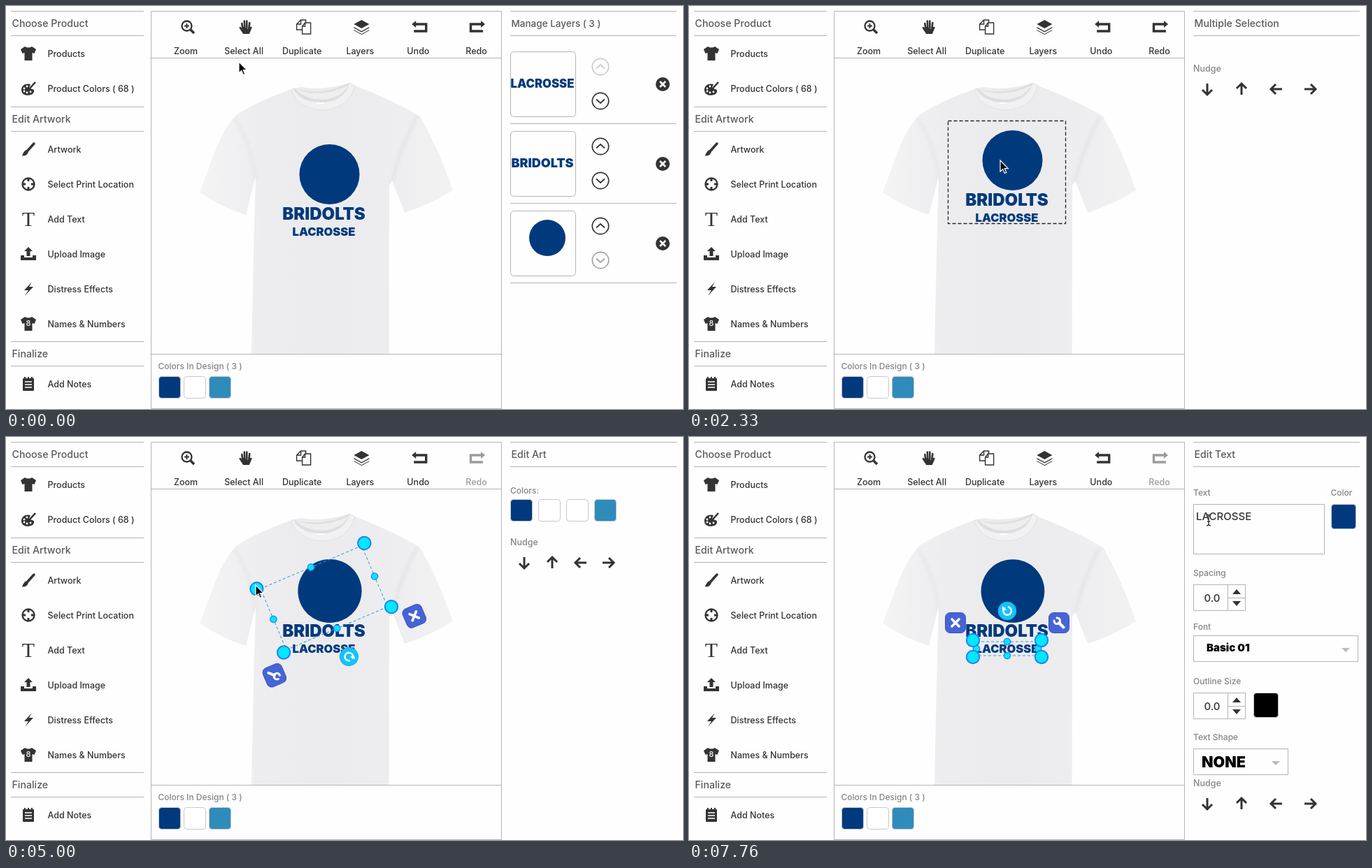
An HTML page for the animation above (8000 ms loop, 968x577 px).

```html
<!DOCTYPE html>
<html lang="en">
<head>
<meta charset="utf-8">
<title>Shirt designer</title>
<style>
html, body { margin: 0; width: 100%; height: 100%; overflow: hidden; background: #fefefe; }
svg { display: block; width: 968px; height: 577px; font: 500 12.5px Inter, "Open Sans", sans-serif; fill: #333; }
.line { fill: none; stroke: #b4b4b4; }
.stroke { fill: none; stroke: #333; }
.title { font-size: 14.2px; fill: #5a5a5a; }
.label { fill: #858585; }
.heavy { font-weight: 900; fill: #000; }
.print { font-weight: 900; fill: #003a7d; }
.mid { text-anchor: middle; }
.white { fill: #fff; }
</style>
</head>
<body>
<svg id="stage" viewBox="0 0 968 577"></svg>
<script>
const NAVY = '#003a7d', TEAL = '#2f8bb9', TEAM = 'BRIDOLTS', SPORT = 'LACROSSE';

const text = (x, y, s, cls = '', size = '') =>
  `<text x="${x}" y="${y}" class="${cls}"${size && ` style="font-size:${size}px"`}>${s}</text>`;
const path = (d, attrs = '') => `<path d="${d}" ${attrs}/>`;
const line = d => path(d, 'class="line"');
const stroke = (d, w = 2, attrs = '') => path(d, `class="stroke" stroke-width="${w}" ${attrs}`);
const circle = (x, y, r, attrs = '') => `<circle cx="${x}" cy="${y}" r="${r}" ${attrs}/>`;
const rect = (x, y, w, h, attrs = 'class="line"') =>
  `<rect x="${x}" y="${y}" width="${w}" height="${h}" ${attrs}/>`;
const at = (x, y, s, attrs = '') => `<g transform="translate(${x} ${y})" ${attrs}>${s}</g>`;
const group = (id, s) => `<g id="${id}">${s}</g>`;
const swatch = (x, y, fill, size = 31) =>
  rect(x + .5, y + .5, size, size, `rx="4" fill="${fill}" stroke="#c4c8d2"`);

const tee = path('M-5-10Q0-7 5-10L11-6 8.500 0 5.500-1V10H-5.500V-1L-8.500 0-11-6Z');
const undo = stroke('M-6-4H9.500V6H-8', 3.4) + path('M-11-4L-5-9V1Z');
const icons = {
  tee,
  palette: path('M-10 2C-10-5-3-8 3-6L1-1 5 1C9 1 9 5 6 8C1 11-10 11-10 2Z') +
    [[-6, 0], [-2, -3], [-6, 4], [-2, 6], [3, 5]].map(p => circle(...p, 1.4, 'class="white"')).join('') +
    stroke('M1 1L10-9', 2.6),
  brush: stroke('M-1 2L8-8', 3.5, 'stroke-linecap="round"') + path('M-9 9.500Q-2 10 0 4L-3 1Q-7 3-9 9.500Z'),
  target: circle(0, 0, 8.5, 'class="stroke" stroke-width="2.4"') + stroke('M0-9V-4M0 9V4M-9 0H-4M9 0H4', 3),
  letter: `<text class="mid" y="10" style="font:30px 'Liberation Serif',serif">T</text>`,
  upload: path('M0-10L6-4H2.500V3H-2.500V-4H-6Z') + path('M-11 2H-6V5H6V2H11V9H-11Z'),
  bolt: path('M5-10L-6 2H0L-5 10 7-3H1Z'),
  jersey: tee + text(0, 3, '8', 'mid white', 11),
  notes: rect(-8, -8, 16, 18, 'rx="1"') + stroke('M-5-10V-7M0-10V-7M5-10V-7') +
    path('M-5-3H5M-5 1H5M-5 5H5', 'stroke="#fff" stroke-width="1.5"'),
  zoom: circle(-1.5, -1.5, 7, 'class="stroke" stroke-width="2.3"') +
    stroke('M-5-1.500H2M-1.500-5V2') + stroke('M4 4L9 9', 3.5),
  hand: path('M-6 1L-4 10H5L8 3 7 0 4 3-5-1Z') +
    stroke('M-4.500 2L-5.500-5M-1.500 1L-2-8.500M1.500 1V-8.500M4.500 2L5.500-6M2 7L7.500 1M-4 7L-8 1', 2.6, 'stroke-linecap="round"'),
  copy: stroke('M-4-10H3V4H-10V-4ZM-4-10V-4H-10', 1.4) +
    path('M2-6H10V10H-2V-1Z', 'fill="#fefefe" stroke="#333" stroke-width="1.4"') + stroke('M2-6V-1H-2', 1.4),
  layers: path('M0-10L11-4 0 2-11-4Z') + path('M-11 0L0 6 11 0V1.500L0 7.500-11 1.500Z M-11 4L0 10 11 4V5L0 11-11 5Z'),
  undo,
  redo: `<g transform="scale(-1 1)">${undo}</g>`,
};

const menu = [
  ['Choose Product', 7, [['Products', 68, 'tee'], ['Product Colors ( 68 )', 118, 'palette']]],
  ['Edit Artwork', 144, [['Artwork', 205, 'brush'], ['Select Print Location', 255, 'target'],
    ['Add Text', 305, 'letter'], ['Upload Image', 355, 'upload'],
    ['Distress Effects', 405, 'bolt'], ['Names &amp; Numbers', 455, 'jersey']]],
  ['Finalize', 480, [['Add Notes', 541, 'notes']]],
].map(([title, y, items]) =>
  line(`M7 ${y + .5}H197M7 ${y + 35.5}H197`) + text(8.5, y + 23, title, 'title') +
  items.map(([s, cy, icon]) => at(32, cy, icons[icon]) + text(59.5, cy + 5, s)).join('')).join('');

const toolbar = [['Zoom', 'zoom'], ['Select All', 'hand'], ['Duplicate', 'copy'],
  ['Layers', 'layers'], ['Undo', 'undo'], ['Redo', 'redo']].map(([s, icon], i) =>
  group('tool' + i, at(260 + i * 82.8, 30, icons[icon]) + text(257 + i * 83.1, 69, s, 'mid'))).join('');

const shirt = `
<defs>
  <linearGradient id="cloth"><stop stop-color="#f4f4f5"/><stop offset=".25" stop-color="#ededef"/>
    <stop offset=".5" stop-color="#ebebed"/><stop offset=".72" stop-color="#ededef"/><stop offset="1" stop-color="#f2f2f3"/></linearGradient>
  <filter id="soft" x="-50%" width="200%"><feGaussianBlur stdDeviation="2.5"/></filter>
  <clipPath id="cut"><use href="#body"/></clipPath>
</defs>` +
path('M411 118Q360 136 329 156Q312 174 300 205L277 267Q308 288 343 299L357 243Q354 340 351 498H547.500L548 257L552 250L570 296Q606 284 639 264Q620 207 592 158Q555 136 499 114L491 110Q452 122 422 116Z', 'id="body" fill="url(#cloth)"') +
`<g clip-path="url(#cut)"><g fill="none" filter="url(#soft)">` +
path('M588 158Q566 195 551 255', 'stroke="#e2e2e5" stroke-width="4"') +
path('M327 160Q352 200 357 250', 'stroke="#e6e6e9" stroke-width="4"') + '</g></g>' +
path('M411 118Q452 130 491 110Q484 135 452 138Q422 138 411 118Z', 'fill="#dedee1"') +
path('M414 119Q452 133 490 113Q480 132 452 134Q426 133 414 119Z', 'fill="#eeeeef"') +
path('M411 118Q421 138 452 138Q484 136 491 110L499 114Q489 148 452 149Q417 147 408 120Z', 'fill="#f1f1f2" stroke="#dedee1" stroke-width=".8"') +
rect(444, 138, 11, 2, 'fill="#fff"');

const arrow = (x, y, turn) =>
  `<g transform="translate(${x} ${y}) rotate(${turn})">${stroke('M0-8V8M-7 1L0 8 7 1', 3)}</g>`;
const nudge = (y, xs) => text(721, y - 25, 'Nudge', 'label') +
  [0, 180, 90, -90].map((turn, i) => arrow(xs[i], y, turn)).join('');
const wide = [741, 790, 840, 888];

const chevron = (y, dir, opacity) => at(850, y, circle(0, 0, 11.7, 'class="stroke" stroke-width="1.7"') +
  stroke(`M-6 ${-2.5 * dir}L0 ${3 * dir} 6 ${-2.5 * dir}`, 1.7), `opacity="${opacity}"`);
const layerRow = (content, i) => at(0, i * 114, rect(721.5, 65.5, 93, 93, 'class="line" rx="5"') + content +
  chevron(87, -1, i ? 1 : .25) + chevron(136, 1, i < 2 ? 1 : .45) + circle(939, 112, 10) +
  path('M935 108L943 116M943 108L935 116', 'stroke="#fff" stroke-width="2.6"') + line('M721 168.500H959'));

const spinner = y => rect(721.5, y + .5, 74, 37) + line(`M770.5 ${y}v37M770.5 ${y + 19.5}h25`) +
  text(748, y + 25, '0.0', 'mid', 15) + path(`M777 ${y + 14}h12l-6-7zM777 ${y + 24}h12l-6 7z`);
const dropdown = (y, w) => rect(721.5, y + .5, w, 37) + path(`M${721 + w - 23} ${y + 18}h12l-6 6z`, 'fill="#bbb"');

const panels = {
  layers: text(722.5, 30, 'Manage Layers ( 3 )', 'title', 13.5) +
    [text(767, 116.5, SPORT, 'print mid', 16.7), text(767, 117, TEAM, 'print mid', 18),
      circle(774, 104, 26, `fill="${NAVY}"`)].map(layerRow).join(''),
  multi: text(722.5, 30, 'Multiple Selection', 'title') + nudge(119, wide),
  art: text(722.5, 30, 'Edit Art', 'title') + text(721, 81, 'Colors:', 'label', 12) +
    [NAVY, '#fff', '#fff', TEAL].map((c, i) => swatch(721 + i * 40, 89, c)).join('') + nudge(180, [741, 781, 822, 861]),
  text: text(722.5, 30, 'Edit Text', 'title') +
    [['Text', 84], ['Spacing', 199], ['Font', 276], ['Outline Size', 354], ['Text Shape', 434]]
      .map(([s, y]) => text(721, y, s, 'label', 12)).join('') +
    text(917.5, 84, 'Color', 'label', 12) + rect(721.5, 96.5, 187, 71) + text(725, 119, SPORT, '', 15) +
    swatch(918, 96, NAVY, 35) + spinner(211) + dropdown(284, 235) + text(740, 307, 'Basic 01', 'heavy', 15) +
    spinner(366) + swatch(807, 366, '#000', 35) + dropdown(446, 135) +
    text(733, 473, 'NONE', 'heavy', 21.5) + nudge(525, wide),
};

const stage = document.getElementById('stage');
stage.innerHTML = menu + shirt +
  group('design', group('art', circle(8, -9, 43, `fill="${NAVY}"`)) +
    text(454.5, 306.3, TEAM, 'print mid', 24) + text(454.5, 329, SPORT, 'print mid', 16.5)) +
  group('dashed', rect(370.5, 184.5, 168, 147, 'fill="none" stroke="#222" stroke-width="1.3" stroke-dasharray="5 3"')) +
  group('guideV', path('M455 157V356', 'stroke="#ff4fae" stroke-width="1.6"')) +
  group('guideH', path('M365 256.500H545', 'stroke="#ff2f9e"')) +
  group('handles', '') + line('M207.500 7.500H708.500V576.500H207.500ZM207 74.500H708M207 498.500H708') + toolbar +
  text(217.5, 520, 'Colors In Design ( 3 )', 'label', 12) +
  [NAVY, '#fff', TEAL].map((c, i) => swatch(218 + i * 36, 530, c)).join('') +
  line('M721 7.500H959M721 42.500H959') +
  Object.entries(panels).map(([id, s]) => group('panel-' + id, s)).join('') +
  group('pointer', path('M-1-1V15L2.700 11.500 5.300 17.500 7.800 16.400 5.200 10.600H10.300Z', 'fill="#000" stroke="#fff" stroke-width="1.2"')) +
  group('caret', stroke('M-3-8Q0-8 0-5V5Q0 8-3 8M3-8Q0-8 0-5M0 5Q0 8 3 8M-2 2H2', 1.3));

const $ = id => document.getElementById(id);
const show = (id, on) => { $(id).style.display = on ? '' : 'none'; };
const move = (id, x, y, more = '') => $(id).setAttribute('transform', `translate(${x} ${y}) ${more}`);

// Selection frame with its resize dots and three tool buttons.
function handles(cx, cy, w, h, turn) {
  const x = w / 2, y = h / 2, blue = 'fill="#00e8ff" stroke="#2180f5"';
  const button = (bx, s) => at(bx, -y - 25, rect(-14.5, -14.5, 29, 29, 'rx="7" fill="#4664d6" stroke="#3a55c0"') + s);
  const white = (d, sw) => path(d, `fill="none" stroke="#fff" stroke-width="${sw}" stroke-linecap="round"`);
  return `<g transform="translate(${cx} ${cy}) rotate(${turn})">` +
    rect(5 - x, 2 - y, w - 10, h - 4, 'fill="none" stroke="#2a9fe8" stroke-dasharray="4 3"') +
    [[0, 2 - y], [0, y - 2], [5 - x, 0], [x - 5, 0]].map(p => circle(...p, 4.7, blue + ' stroke-width="1.3"')).join('') +
    [[-x, -y], [x, -y], [-x, y], [x, y]].map(p => circle(...p, 9.2, blue + ' stroke-width="2"')).join('') +
    button(-x - 25, white('M-5-5L5 5M5-5L-5 5', 3.6)) +
    button(x + 25, white('M0 0L6.500 6.500', 4) + white('M-7-3A4.300 4.300 0 1 0-3-7', 3)) +
    at(0, -y - 42, circle(0, 0, 13, 'fill="#12c4fb" stroke="#1aa5ee"') +
      white('M-4-4A5.800 5.800 0 1 0 2-5.500', 2.4) + path('M-7-7V-1H-1Z', 'class="white"')) + '</g>';
}

// Keys are [time, ...values], eased between neighbours.
function track(keys, t) {
  const next = keys.findIndex(k => k[0] > t);
  if (next === 0) return keys[0].slice(1);
  if (next < 0) return keys[keys.length - 1].slice(1);
  const a = keys[next - 1], b = keys[next];
  const p = (t - a[0]) / (b[0] - a[0]), e = p * p * (3 - 2 * p);
  return a.slice(1).map((v, i) => v + (b[i + 1] - v) * e);
}
const latest = (steps, t) => steps.filter(s => s[0] <= t).pop()[1];

const cursorKeys = [[0, 334, 81], [30, 334, 81], [130, 342, 39], [390, 342, 39], [860, 446, 242],
  [1160, 446, 242], [1200, 446, 241], [1560, 447, 227], [1660, 447, 223], [2260, 447, 223], [2330, 446, 222],
  [2780, 446, 222], [3250, 465, 360], [3460, 465, 360], [3560, 463, 247], [3600, 463, 247], [3700, 463, 208],
  [4050, 463, 208], [4660, 364, 214], [4830, 364, 214], [5000, 358, 213], [5430, 354, 211], [5660, 354, 211],
  [6160, 410, 381], [6300, 410, 381], [6800, 452, 303], [7060, 452, 303], [7760, 743, 119]];
const scaleKeys = [[4830, 1], [5000, 1.06], [5430, 1.1]];
const panelSteps = [[0, 'layers'], [400, 'multi'], [3280, 'layers'], [4050, 'art'], [5690, 'layers'], [7060, 'text']];
const selectSteps = [[0, ''], [400, 'all'], [1030, 'drag'], [2760, 'all'], [3280, ''], [4050, 'art'], [6300, ''], [7060, 'text']];

function draw(now) {
  const t = now % 8000;
  const [x, y] = track(cursorKeys, t);
  const dragEnd = track(cursorKeys, Math.min(Math.max(t, 1030), 2700));
  const dx = dragEnd[0] - 446, dy = dragEnd[1] - 242;
  const scale = t < 5690 ? track(scaleKeys, t)[0] : 1.055;
  const panel = latest(panelSteps, t), selected = latest(selectSteps, t);

  move('design', dx, dy);
  move('art', 454.5, 250, `scale(${scale})`);
  move('dashed', dx, dy);
  show('dashed', selected === 'drag');
  show('guideV', t >= 1200 && t < 1655);
  show('guideH', t >= 1200 && dy > -5);
  $('handles').innerHTML =
    selected === 'all' ? handles(454.5, 258 + dy, 168, 147, 0) :
    selected === 'art' ? handles(454.7, 230.2, 157.7 * scale, 93.4 * scale, 157) :
    selected === 'text' ? handles(455, 303, 98, 24, 0) : '';

  for (const id in panels) show('panel-' + id, id === panel);
  $('tool5').style.opacity = t < 2760 ? 1 : .48;
  $('tool1').lastChild.style.fill = x > 312 && x < 368 && y < 74 ? '#23527c' : '';

  const typing = panel === 'text' && x > 721 && y > 96;
  show('pointer', !typing);
  show('caret', typing);
  move(typing ? 'caret' : 'pointer', x, y);
  requestAnimationFrame(draw);
}
requestAnimationFrame(draw);
</script>
</body>
</html>
```
